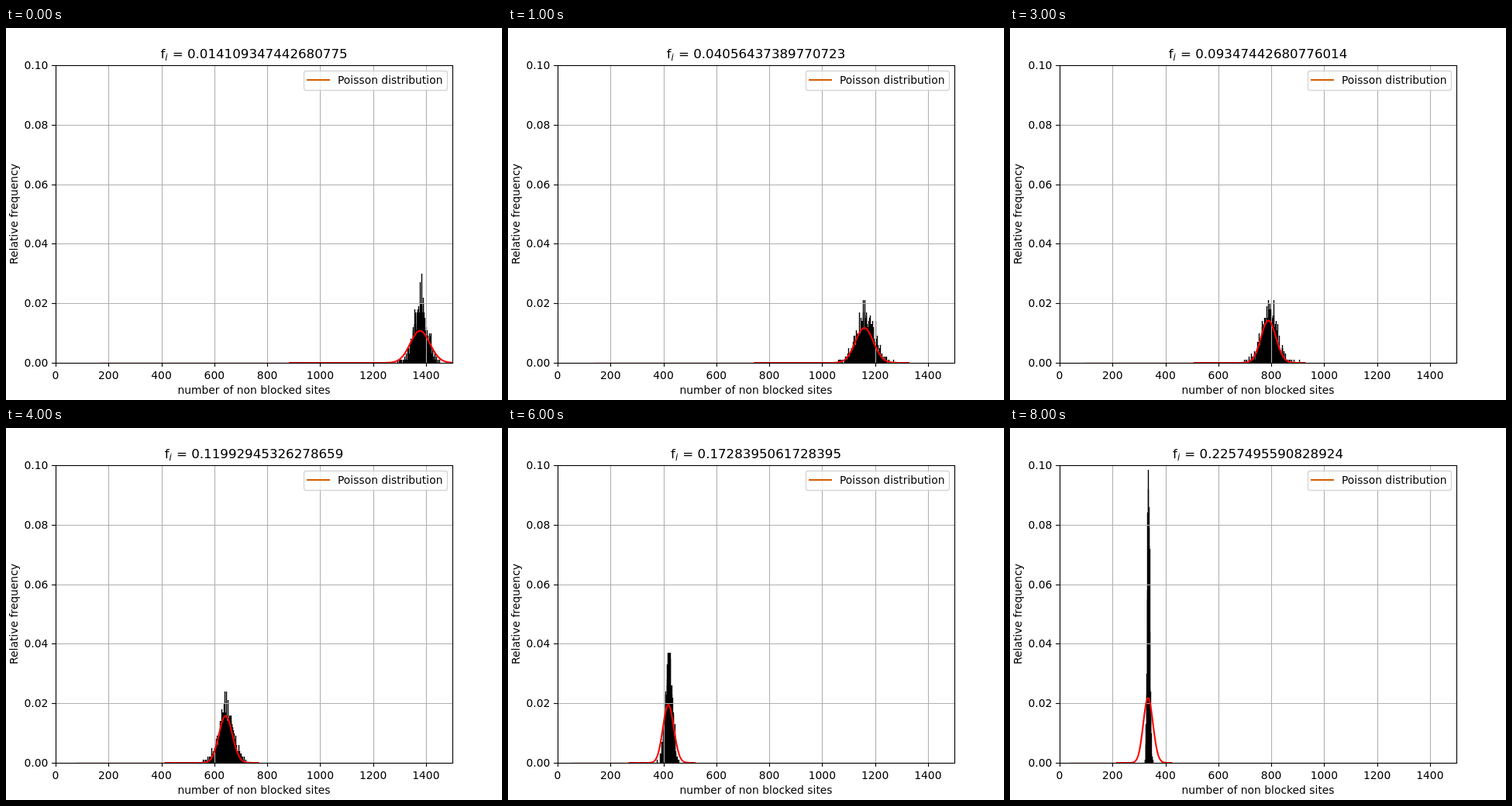
Write an HTML page with a canvas that moves like this. It is 640 px wide and 480 px high and loops after 8.5 s.

```html
<!DOCTYPE html>
<html lang="en">
<head>
<meta charset="utf-8">
<style>
html, body { margin: 0; width: 100%; height: 100%; overflow: hidden; background: #fff; }
canvas { display: block; }
</style>
</head>
<body>
<canvas id="stage" width="640" height="480"></canvas>
<script>
const ctx = document.getElementById('stage').getContext('2d');
const FONT = '"DejaVu Sans", sans-serif';
const LEFT = 64, RIGHT = 576, TOP = 48, BOTTOM = 432;
const STEP_MS = 500, STEPS = 17, SAMPLES = 1000;

// step, mean, spread, tallest bin, position of tallest bin
const KEYS = [
  [0, 1378, 24, 0.030, 1382], [2, 1160, 32, 0.021, 1160], [4, 966, 31, 0.022, 968],
  [6, 790, 28, 0.021, 789], [8, 643, 25, 0.024, 644], [10, 514, 20, 0.027, 515],
  [12, 419, 12, 0.037, 419], [14, 363, 7.5, 0.058, 363], [16, 335, 4.4, 0.0985, 335]
];

const px = v => LEFT + v * (RIGHT - LEFT) / 1500;
const py = v => BOTTOM - v * (BOTTOM - TOP) / 0.1;
const snap = v => Math.round(v) + 0.5;

function stateAt(step) {
  const i = Math.min(step >> 1, KEYS.length - 2);
  const a = KEYS[i], b = KEYS[i + 1], u = (step - a[0]) / 2;
  return a.map((v, j) => v + (b[j] - v) * u).slice(1);
}

function randomFrom(seed) {
  return () => {
    seed = (seed + 0x6D2B79F5) | 0;
    let t = Math.imul(seed ^ (seed >>> 15), 1 | seed);
    t = (t + Math.imul(t ^ (t >>> 7), 61 | t)) ^ t;
    return ((t ^ (t >>> 14)) >>> 0) / 4294967296;
  };
}

// Stirling form of the Poisson probability
const poisson = (x, m) => Math.exp(x - m + x * Math.log(m / x)) / Math.sqrt(2 * Math.PI * x);

function line(x1, y1, x2, y2, color = '#000', width = 1.11) {
  ctx.strokeStyle = color;
  ctx.lineWidth = width;
  ctx.beginPath();
  ctx.moveTo(x1, y1);
  ctx.lineTo(x2, y2);
  ctx.stroke();
}

function text(str, x, y, align = 'center', size = 13.89, style = '') {
  ctx.font = `${style} ${size}px ${FONT}`;
  ctx.textAlign = align;
  ctx.fillStyle = '#000';
  ctx.fillText(str, x, y);
  return ctx.measureText(str).width;
}

function drawBars(step, mean, spread, peak, peakAt) {
  const random = randomFrom(step + 11), bins = new Map();
  for (let i = 0; i < SAMPLES; i++) {
    const z = Math.sqrt(-2 * Math.log(1 - random())) * Math.cos(2 * Math.PI * random());
    const bin = Math.round(mean + spread * z);
    bins.set(bin, (bins.get(bin) || 0) + 1 / SAMPLES);
  }
  bins.set(Math.round(peakAt), peak);
  ctx.fillStyle = '#000';
  for (const [bin, height] of bins) {
    const y = Math.round(py(Math.min(height, peak)));
    ctx.fillRect(Math.round(px(bin)) - 0.2, y, 1.4, BOTTOM - y);
  }
}

function drawCurve(mean) {
  ctx.fillStyle = 'rgba(255,0,0,0.12)';
  ctx.fillRect(px(0.12 * mean), BOTTOM - 1, px(0.64 * mean) - px(0.12 * mean), 1);
  ctx.strokeStyle = '#f00';
  ctx.lineWidth = 2.08;
  ctx.lineJoin = 'round';
  ctx.beginPath();
  for (let x = Math.round(0.64 * mean); x <= Math.min(1500, mean + 5 * Math.sqrt(mean)); x++) {
    ctx.lineTo(px(x), py(poisson(x, mean)));
  }
  ctx.stroke();
}

function drawTitle(step) {
  const value = ` = ${(32 + 30 * step) / 2268}`;
  ctx.font = `16.67px ${FONT}`;
  const width = ctx.measureText('f' + value).width + 4.1;
  let x = 320 - width / 2;
  x += text('f', x, 39, 'left', 16.67);
  text('i', x, 41.5, 'left', 11.67, 'italic');
  text(value, x + 4.1, 39, 'left', 16.67);
}

function drawLegend() {
  ctx.beginPath();
  ctx.roundRect(384.5, 55.5, 185, 25, 2.8);
  ctx.fillStyle = 'rgba(255,255,255,0.8)';
  ctx.fill();
  ctx.strokeStyle = 'rgba(204,204,204,0.8)';
  ctx.lineWidth = 1.39;
  ctx.stroke();
  line(388, 67, 418, 67, '#d55e00', 2.08);
  text('Poisson distribution', 428, 72, 'left');
}

function draw(step) {
  const state = stateAt(step);
  ctx.fillStyle = '#fff';
  ctx.fillRect(0, 0, 640, 480);

  ctx.save();
  ctx.beginPath();
  ctx.rect(LEFT, TOP, RIGHT - LEFT, BOTTOM - TOP);
  ctx.clip();
  drawBars(step, ...state);
  for (let v = 0; v <= 1400; v += 200) line(snap(px(v)), TOP, snap(px(v)), BOTTOM, '#b0b0b0');
  for (let i = 0; i <= 5; i++) line(LEFT, snap(py(i / 50)), RIGHT, snap(py(i / 50)), '#b0b0b0');
  drawCurve(state[0]);
  ctx.restore();

  for (let v = 0; v <= 1400; v += 200) {
    line(snap(px(v)), BOTTOM, snap(px(v)), BOTTOM + 5);
    text(v, px(v), 453);
  }
  for (let i = 0; i <= 5; i++) {
    const y = py(i / 50);
    line(LEFT - 5, snap(y), LEFT, snap(y));
    text((i / 50).toFixed(2), 54.3, Math.round(y) + 5, 'right');
  }
  ctx.strokeStyle = '#000';
  ctx.lineWidth = 1.11;
  ctx.strokeRect(LEFT + 0.5, TOP + 0.5, RIGHT - LEFT, BOTTOM - TOP);

  text('number of non blocked sites', 320, 472);
  ctx.save();
  ctx.translate(14.5, 240);
  ctx.rotate(-Math.PI / 2);
  text('Relative frequency', 0, 0);
  ctx.restore();
  drawTitle(step);
  drawLegend();
}

let shown = -1;
const start = performance.now();
function tick() {
  const step = Math.floor(Math.max(0, performance.now() - start) / STEP_MS) % STEPS;
  if (step !== shown) draw(shown = step);
  requestAnimationFrame(tick);
}
tick();
</script>
</body>
</html>
```
